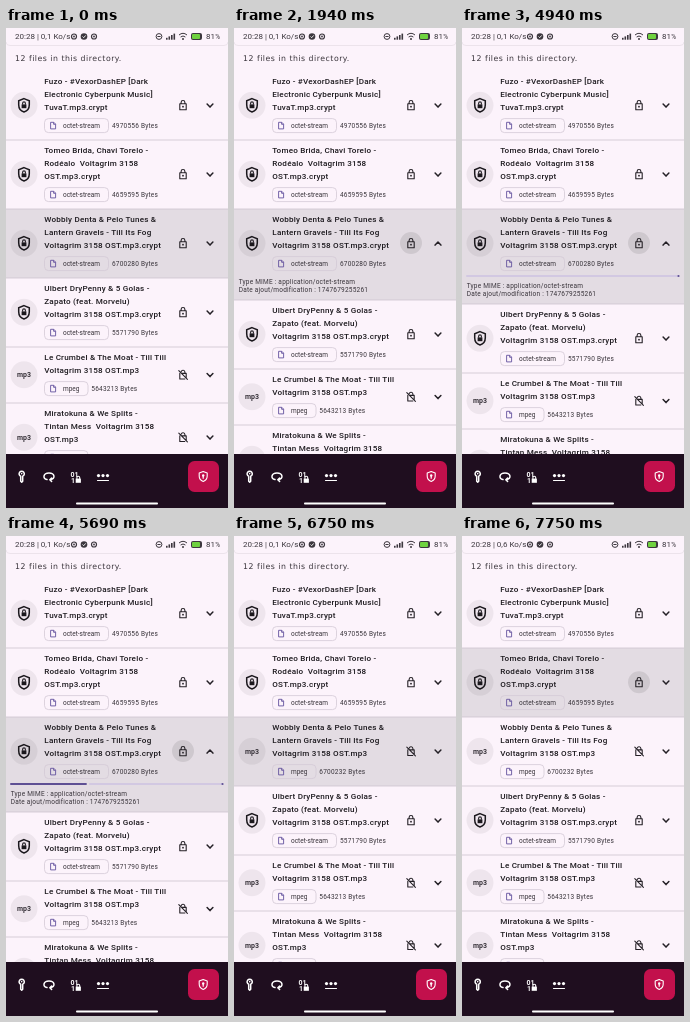
These frames come from a looping animation (222 by 480 pixels, 8000 ms). An HTML page:

```html
<!DOCTYPE html>
<html lang="en">
<head>
<meta charset="utf-8">
<title>Directory list</title>
<style>
  html, body { margin: 0; width: 100%; height: 100%; overflow: hidden; background: #fcf3fb; }
  svg { display: block; width: 100vw; height: 100vh; }
  text { font-family: Roboto, sans-serif; font-size: 6.5px; fill: #39343b; white-space: pre; }
  .name { font-size: 8.1px; font-weight: 500; letter-spacing: .2px; fill: #1d1a1f; }
  .small { letter-spacing: .22px; }
  .kind { font-size: 7px; font-weight: 700; text-anchor: middle; }
  .heading { font: 7.8px "DejaVu Sans", sans-serif; letter-spacing: .5px; }
  .status { font-size: 8px; fill: #3c373e; }
  .line { fill: none; stroke: #242026; stroke-width: 1.1; stroke-linecap: round; stroke-linejoin: round; }
  .bold { stroke-width: 1.5; }
  .bar .line { stroke: #fff; }
  .bar text { font-size: 7px; font-weight: 700; fill: #fff; }
</style>
</head>
<body>
<svg id="stage" viewBox="0 0 222 480" preserveAspectRatio="none"></svg>
<script>
const LOOP = 8000, OPEN = 750, WORK = 4940, DONE = 6750, LEAVE = 7630;
const FIRST_TOP = 43;
const GAME = "Voltagrim 3158";

const files = [
  { lines: ["Fuzo - #VexorDashEP [Dark", "Electronic Cyberpunk Music]", "TuvaT.mp3.crypt"], bytes: 4970556 },
  { lines: ["Tomeo Brida, Chavi Torelo -", `Rodéalo  ${GAME}`, "OST.mp3.crypt"], bytes: 4659595 },
  { lines: ["Wobbly Denta & Pelo Tunes &", "Lantern Gravels - Till Its Fog", `${GAME} OST.mp3.crypt`], bytes: 6700280 },
  { lines: ["Ulbert DryPenny & 5 Golas -", "Zapato (feat. Morvelu)", `${GAME} OST.mp3.crypt`], bytes: 5571790 },
  { lines: ["Le Crumbel & The Moat - Till Till", `${GAME} OST.mp3`], bytes: 5643213 },
  { lines: ["Miratokuna & We Splits -", `Tintan Mess  ${GAME}`, "OST.mp3"], bytes: 6281904 }
];
const unlocked = {
  lines: files[2].lines.map(s => s.replace(".crypt", "")),
  bytes: 6700232
};

const rowHeight = file => 30 + 13 * file.lines.length;
const line = (d, cls = "", extra = "") => `<path class="line ${cls}" d="${d}" ${extra}/>`;
const text = (x, y, s, cls = "") => `<text x="${x}" y="${y}" class="${cls}">${s.replace(/&/g, "&amp;")}</text>`;
const at = (x, y, s) => `<g transform="translate(${x} ${y})">${s}</g>`;

const padlock = line("M-3.2-1.5H3.2V4.4H-3.2ZM-1.9-1.6V-2.9a1.9 1.9 0 0 1 3.8 0v1.3") +
  `<circle cy="1.4" r=".9" fill="#242026"/>`;
const struckLock = line("M-1.2-1.4H3.2V3M1.8 4.2H-3.2V-1.4M-1.8-3.2a1.9 1.9 0 0 1 3.7.4v1.2M-4.2-4.2L4.4 4.6");
const shield = `<path d="M0-6.7L5.3-4.6V-.5C5.3 2.9 3.1 5.8 0 6.7C-3.1 5.8-5.3 2.9-5.3-.5V-4.6Z"
    fill="none" stroke="#1b181d" stroke-width="1.5"/>
  <path d="M-2.4-.9H2.4V2.9H-2.4Z" fill="#1b181d"/>` + line("M-1.4-1v-1a1.4 1.4 0 0 1 2.8 0V-1");

function rowMarkup(file) {
  const n = file.lines.length, mid = rowHeight(file) / 2 - .2, chip = 2 + 13 * n + 4.6;
  const locked = file.lines[n - 1].endsWith(".crypt");
  const chipWidth = locked ? 64 : 43.5;
  return `<circle cx="18" cy="${mid}" r="13.5" fill="#000" opacity=".055"/>` +
    (locked ? at(18, mid, shield) : text(18, mid + 2.4, "mp3", "kind")) +
    file.lines.map((s, i) => text(38.3, 13.4 + 12.9 * i, s, "name")).join("") +
    `<rect x="38.5" y="${chip + 2}" width="${chipWidth}" height="14" rx="4" fill="none" stroke="#d3cad6" stroke-width=".8"/>` +
    at(47, chip + 9, `<path d="M-2.4-3.3H.8L2.6-1.5V3.3H-2.4ZM.6-3.2V-1.3H2.5" fill="none" stroke="#65539f" stroke-width=".9"/>`) +
    text(57, chip + 11.3, locked ? "octet-stream" : "mpeg") +
    text(locked ? 106 : 85.3, chip + 11.3, `${file.bytes} Bytes`, "small") +
    at(177, mid, locked ? padlock : struckLock) +
    at(204, mid + .3, line("M-2.9-1.5L0 1.5L2.9-1.5", "bold", "data-chevron"));
}

const row = (file, id) => `<g id="${id}">${rowMarkup(file)}</g>`;
const disc = id => `<circle id="${id}"/>`;

document.getElementById("stage").innerHTML = `
  <rect width="222" height="480" fill="#fcf3fb"/>
  <path d="M0 14Q0 17.5 4 17.5H218Q222 17.5 222 14" fill="none" stroke="#e9e0e8" stroke-width=".8"/>
  <text class="status" id="speed" x="9" y="11"></text>
  <g fill="#3c373e">
    ${[68, 88].map(x => `<circle cx="${x}" cy="8.5" r="2.5" fill="none" stroke="#3c373e" stroke-width="1.2"/>
      <circle cx="${x}" cy="8.5" r=".9"/>`).join("")}
    <circle cx="78" cy="8.5" r="3.3"/>
    <path d="M76.5 8.5L77.7 9.7L79.7 7.4" fill="none" stroke="#fff" stroke-width=".9"/>
    <circle cx="153" cy="8.5" r="2.9" fill="none" stroke="#3c373e"/>
    <path d="M151.4 8.5H154.6" stroke="#3c373e"/>
    ${[0, 1, 2, 3].map(i => `<rect x="${160 + 2.5 * i}" y="${9.8 - 1.4 * i}" width="1.6" height="${1.9 + 1.4 * i}"/>`).join("")}
    <path d="M173 7Q177 3.6 181 7M174.6 9Q177 7 179.4 9" fill="none" stroke="#3c373e"/>
    <circle cx="177" cy="10.9" r="1"/>
    <rect x="185" y="5" width="11" height="7" rx="2"/>
    <rect x="186" y="6" width="8" height="5" rx="1" fill="#6fd23f"/>
  </g>
  ${text(200, 11.2, "81", "status")}${text(209.2, 11.2, "%")}
  ${text(9, 33.4, "12 files in this directory.", "heading")}
  <rect id="highlight" width="222" fill="#e3dce3"/>
  ${disc("chevronHover")}${disc("chevronRipple")}${disc("lockHover")}${disc("lockRipple")}
  ${files.map((f, i) => row(f, "row" + i)).join("")}
  ${row(unlocked, "unlocked")}
  ${files.map((f, i) => `<rect id="divider${i}" width="222" height=".8" fill="#cbc3cc"/>`).join("")}
  <g id="progress">
    <path id="track" stroke="#d2c8e2" stroke-width="2" stroke-linecap="round"/>
    <path id="fill" stroke="#5f5094" stroke-width="2" stroke-linecap="round"/>
    <circle cx="216.5" cy="248" r="1.1" fill="#5f5094"/>
  </g>
  <g id="details">
    ${text(4.7, 256.3, "Type MIME : application/octet-stream", "small")}
    ${text(4.7, 264.3, "Date ajout/modification : 1747679255261", "small")}
  </g>
  <g class="bar">
    <rect y="426" width="222" height="54" fill="#1f0e1f"/>
    ${at(15.7, 449, line("M-1-.8A2.6 2.6 0 1 1 1-.8V4.2L0 5.2L-1 4.2ZM0-3.6V-3.2", "bold"))}
    ${at(43, 449, line("M-2 2.6C-6.8 1.8-5.8-4 0-4S6.8 1.8 1.6 2.6M2.6 1L.8 2.7L2.6 4.4", "bold"))}
    ${text(64.5, 448.6, "01")}${text(65, 454.8, "1")}
    ${at(72.3, 451.2, `<path d="M-2.6-.6H2.6V3.6H-2.6Z" fill="#fff"/>` + line("M-1.4-.8V-1.6a1.4 1.4 0 0 1 2.8 0v.8"))}
    ${[92.5, 97, 101.5].map(x => `<circle cx="${x}" cy="447.6" r="1.6" fill="#fff"/>`).join("")}
    ${line("M91.5 452.5H102.5")}
    <rect x="182" y="433" width="31" height="31" rx="6.5" fill="#c2104c"/>
    ${at(197.2, 448.5, line("M0-5L4-3.4V-.4C4 2.2 2.3 4.2 0 5C-2.3 4.2-4 2.2-4-.4V-3.4Z") +
      `<circle cy="-1" r="1.2" fill="#fff"/><path d="M-.6-1H.6V2.2H-.6Z" fill="#fff"/>`)}
    <rect x="70" y="474.6" width="82" height="1.8" rx=".9" fill="#fff"/>
  </g>`;

const $ = id => document.getElementById(id);
const set = (id, attrs) => Object.entries(attrs).forEach(([k, v]) => $(id).setAttribute(k, v));
const show = (id, on) => { $(id).style.display = on ? "" : "none"; };
const ramp = (t, a, b) => Math.min(1, Math.max(0, (t - a) / (b - a)));
const drawDisc = (id, cx, cy, r, opacity) => set(id, { cx, cy, r, opacity });

function draw(t) {
  const open = t >= OPEN && t < DONE, working = t >= WORK && t < DONE, done = t >= DONE;
  const extra = working ? 26 : open ? 22 : 0;
  const onSecond = t >= LEAVE;

  let top = FIRST_TOP;
  files.forEach((file, i) => {
    const height = rowHeight(file) + (i === 2 ? extra : 0);
    set("row" + i, { transform: `translate(0 ${top})` });
    if (i === 2) set("unlocked", { transform: `translate(0 ${top})` });
    if (i === (onSecond ? 1 : 2)) set("highlight", { y: top, height });
    top += height;
    set("divider" + i, { y: top - .4 });
  });
  show("row2", !done);
  show("unlocked", done);
  $("row2").querySelector("[data-chevron]").setAttribute("transform", open ? "scale(1 -1)" : "");

  show("details", open);
  set("details", { transform: `translate(0 ${working ? 4 : 0})` });
  show("progress", working);
  const end = Math.min(177, 177 - (6500 - t) * .12), started = end > 5;
  show("fill", started);
  set("fill", { d: `M5 248H${end}` });
  set("track", { d: `M${started ? end + 4 : 5} 248H216.5` });

  drawDisc("chevronHover", 204, 215, 11, .09 * ramp(t, 30, 130) * (1 - ramp(t, 1310, 1560)));
  drawDisc("chevronRipple", 204, 215, 11 * ramp(t, 770, 900), .08 * (1 - ramp(t, 900, 1060)));
  const hovering = t >= 1940 && t < DONE || t >= 7750;
  drawDisc("lockHover", 177, onSecond ? 146.2 : 215, 11, hovering ? .09 : 0);
  drawDisc("lockRipple", 177, 215, 11 * ramp(t, 2600, 2810), .09 * (1 - ramp(t, 3000, 3310)));

  $("speed").textContent = `20:28 | 0,${t < 7440 ? 1 : 6} Ko/s`;
}

function tick() {
  draw(performance.now() % LOOP);
  requestAnimationFrame(tick);
}
tick();
</script>
</body>
</html>
```
